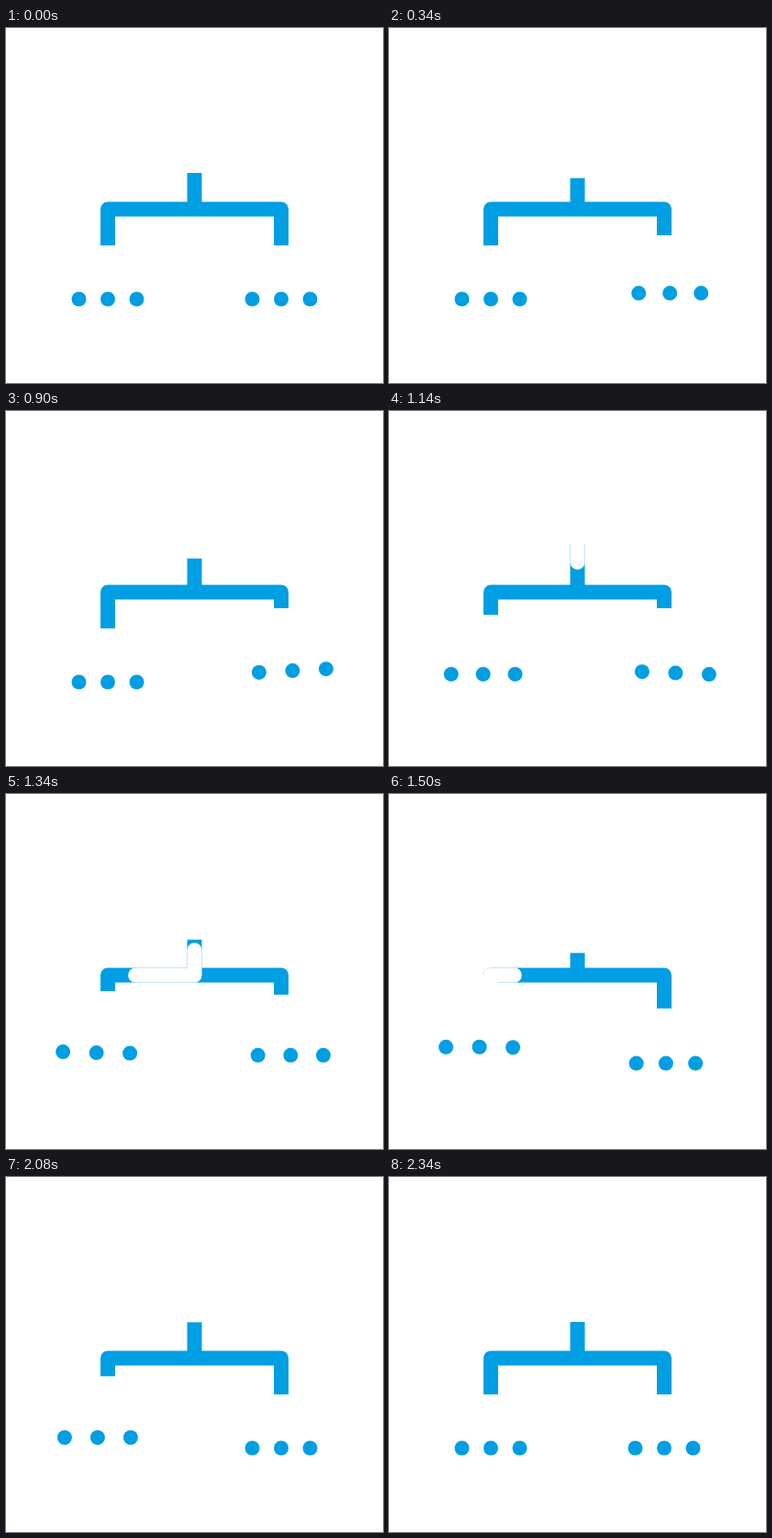
Animation, 411 px wide and 387 px high, one loop 2.5 s. Source, as an HTML page:

```html
<!DOCTYPE html>
<html lang="en">
<head>
<meta charset="utf-8">
<title>Tree</title>
<style>
  html, body { margin: 0; width: 100%; height: 100%; overflow: hidden; background: #fff; }
  svg { display: block; width: 100vw; height: 100vh; }
  .pulse { fill: none; stroke: #fff; stroke-width: 16; stroke-linecap: round; stroke-linejoin: round; }
</style>
</head>
<body>
<svg id="stage" viewBox="0 0 411 387"></svg>
<script>
const LOOP = 2500, STEP = 20, BLUE = '#009ee3';
const BAR_Y = 197.5, STEM_X = 205.5, STEM_Y = 145;
const PULSE_LEN = 192;
const stage = document.getElementById('stage');

function add(tag, attrs) {
  const el = document.createElementNS('http://www.w3.org/2000/svg', tag);
  return set(el, attrs);
}
function set(el, attrs) {
  for (const k in attrs) el.setAttribute(k, attrs[k]);
  if (!el.parentNode) stage.appendChild(el);
  return el;
}

// Eased value from a table of [time, value] steps
function ease(steps, t) {
  if (t <= steps[0][0]) return steps[0][1];
  for (let i = 1; i < steps.length; i++) {
    const [t0, a] = steps[i - 1], [t1, b] = steps[i];
    if (t < t1) {
      const p = (t - t0) / (t1 - t0);
      return a + (b - a) * p * p * (3 - 2 * p);
    }
  }
  return steps[steps.length - 1][1];
}

const STEM = [[160, 158], [660, 177], [1130, 145.5], [1600, 177], [2120, 158]];
const TILT = [[480, 0], [660, 1], [900, 0], [1560, 0], [1780, 0.5], [2020, 0]];
const GROW = [[170, 0], [510, 1], [1255, 1], [1580, 0]];
const WAVE = [[540, 0], [750, -7], [1040, 7], [1220, 0]];

const stem = add('polygon', { fill: BLUE });
const frame = add('path', {
  fill: 'none', stroke: BLUE, 'stroke-width': 16, 'stroke-linejoin': 'round'
});

const sides = [
  { x: 300, dir: 1, delay: 0 },
  { x: 111, dir: -1, delay: 760 }
];
for (const s of sides) {
  s.pulse = add('path', {
    class: 'pulse', d: `M${STEM_X} ${STEM_Y}V${BAR_Y}H${s.x}V260`
  });
}
for (const s of sides) {
  s.dots = [-1, 0, 1].map(() => add('circle', { r: 8, fill: BLUE }));
}

function drawPulse(s, u) {
  const head = Math.min(PULSE_LEN, 0.485 * (u - 339));
  const tail = Math.max(0, 0.6 * (u - 538));
  const on = head > tail;
  set(s.pulse, {
    visibility: on ? 'visible' : 'hidden',
    'stroke-dasharray': `${on ? head - tail : 1} 999`,
    'stroke-dashoffset': -tail
  });
}

function drawDots(s, u, grow) {
  s.dots.forEach((dot, i) => {
    const n = i - 1;
    set(dot, {
      cx: s.x + s.dir * 12.4 * grow + n * (31.5 + 5 * grow),
      cy: 295.5 - 12.8 * grow + ease(WAVE, u - n * 26)
    });
  });
}

function draw(t) {
  const top = ease(STEM, t), tilt = ease(TILT, t);
  set(stem, {
    points: `197.5,${top - tilt} 213.5,${top + tilt} 213.5,198 197.5,198`
  });
  const [right, left] = sides.map(s => {
    const u = t - s.delay, grow = ease(GROW, u);
    drawPulse(s, u);
    drawDots(s, u, grow);
    return 237 - 22 * grow;
  });
  set(frame, { d: `M111 ${left}V${BAR_Y}H300V${right}` });
}

const start = performance.now();
function tick() {
  const t = (performance.now() - start) % LOOP;
  draw(Math.floor(t / STEP) * STEP);
  requestAnimationFrame(tick);
}
tick();
</script>
</body>
</html>
```
